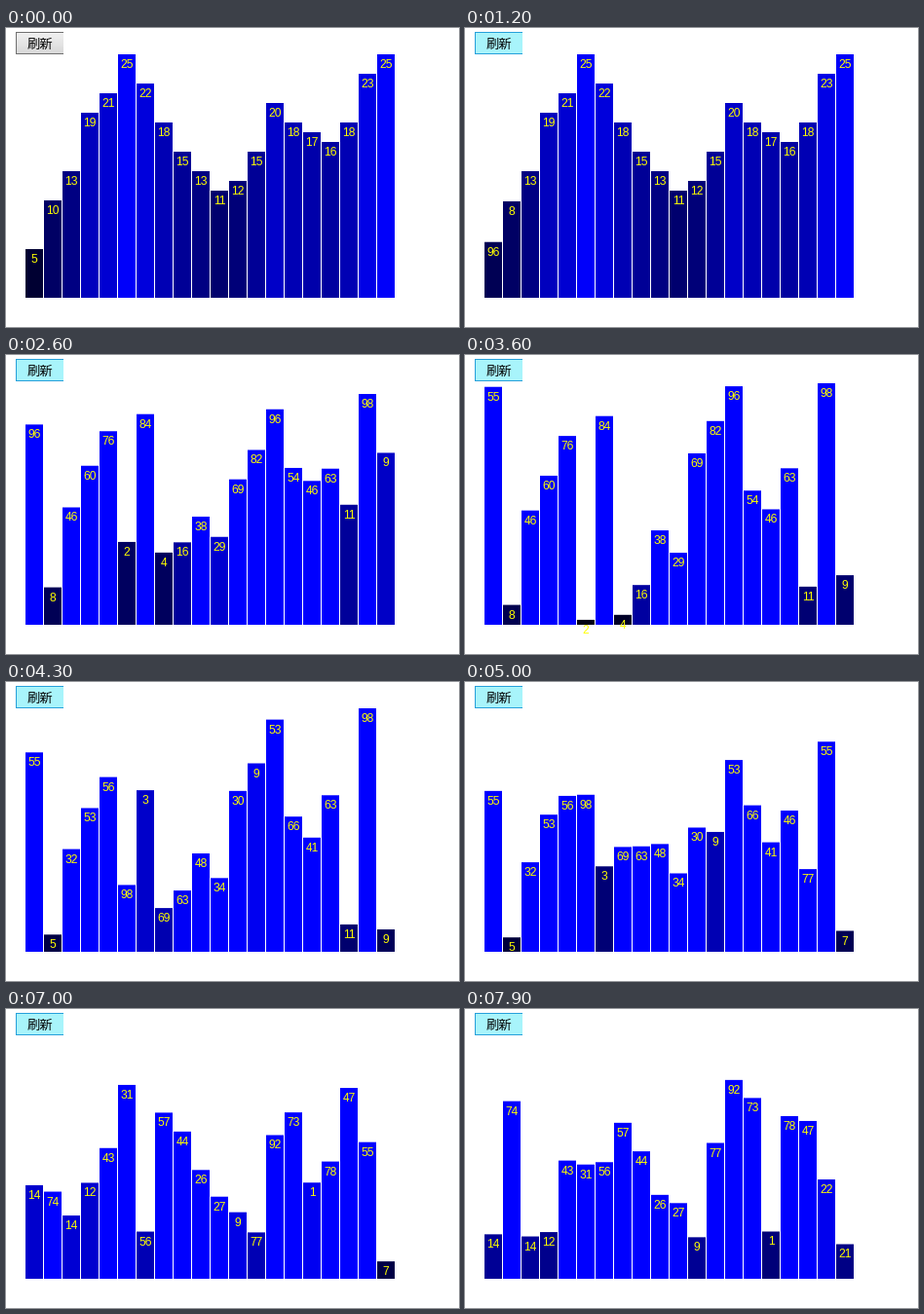
Write a matplotlib script that moves like this. It is 465 px wide and 307 px high and loops after 8000 ms.

```python
import matplotlib.pyplot as plt
import numpy as np
from matplotlib.animation import FuncAnimation
from matplotlib.colors import to_rgb
from matplotlib.patches import Rectangle

W, H, DPI = 465, 307, 100
STEP, FRAMES = 100, 80
LEFT, BASE, BAND, BAR_W, CHART_H = 20, 277, 19, 18, 250
DELAY, DURATION = 50, 2000

FIRST = [5, 10, 13, 19, 21, 25, 22, 18, 15, 13,
         11, 12, 15, 20, 18, 17, 16, 18, 23, 25]
# (clock time of the click, new values)
UPDATES = [
    (0, [96, 8, 46, 60, 76, 2, 84, 4, 16, 38,
         29, 69, 82, 96, 54, 46, 63, 11, 98, 9]),
    (2692, [55, 5, 32, 53, 56, 98, 3, 69, 63, 48,
            34, 30, 9, 53, 66, 41, 46, 77, 55, 7]),
    (5553, [14, 74, 14, 12, 43, 31, 56, 57, 44, 26,
            27, 9, 77, 92, 73, 1, 78, 47, 22, 21]),
]
# The chart's clock runs slightly faster than playback
PLAY_MS = [1132, 1700, 2600, 3600, 5000, 5900, 7900]
CLOCK_MS = [0, 622, 1597, 2704, 4217, 5212, 7404]

HOVER_AT = 600
PRESSES = (1100, 3500, 6100)
# border, top fill, bottom fill
NORMAL = ("#707070", "#f0f0f0", "#d9d9d9")
HOVER = ("#26a0da", "#a8f4fb", "#a8f4fb")
PRESSED = ("#26a0da", "#84e6f8", "#84e6f8")


def px(size):
    return size * 72 / DPI


def gradient(top, bottom, rows=21):
    mix = np.linspace(0, 1, rows)[:, None, None]
    return (1 - mix) * np.array(to_rgb(top)) + mix * np.array(to_rgb(bottom))


fig = plt.figure(figsize=(W / DPI, H / DPI), dpi=DPI, facecolor="white")
ax = fig.add_axes([0, 0, 1, 1])

border = ax.add_patch(Rectangle((10, 4), 49, 23, lw=0, fc=NORMAL[0], zorder=1))
face = ax.imshow(gradient(*NORMAL[1:]), extent=(11, 58, 26, 5),
                 aspect="auto", interpolation="nearest", zorder=2)
ax.text(34.5, 21, "刷新", family="Noto Sans CJK JP", size=px(13.33),
        ha="center", va="baseline", zorder=3)

bars, labels = [], []
for i in range(len(FIRST)):
    x = LEFT + i * BAND
    bars.append(ax.add_patch(
        Rectangle((x, BASE), BAR_W, 0, lw=0, snap=False, zorder=1)))
    labels.append(ax.text(x + BAR_W / 2, BASE, "", color="yellow",
                          family="Liberation Sans", size=px(12),
                          ha="center", va="baseline", zorder=3))

ax.set_xlim(0, W)
ax.set_ylim(H, 0)
ax.axis("off")


def bar_state(i, clock):
    """Value shown, height and blue level of one bar."""
    value = FIRST[i]
    height = value * CHART_H / max(FIRST)
    blue = value * 10
    for start, values in UPDATES:
        elapsed = clock - start - i * DELAY
        if elapsed <= 0:
            break
        p = min(1, elapsed / DURATION)
        value = values[i]
        height += (value * CHART_H / max(values) - height) * p
        blue = min(255, blue + (value * 10 - blue) * p)
    return value, height, blue


def draw_button(t):
    style = PRESSED if t in PRESSES else HOVER if t >= HOVER_AT else NORMAL
    border.set_facecolor(style[0])
    face.set_data(gradient(*style[1:]))


def draw(n):
    t = n * STEP
    draw_button(t)
    clock = np.interp(t, PLAY_MS, CLOCK_MS)
    for i, (bar, label) in enumerate(zip(bars, labels)):
        value, height, blue = bar_state(i, clock)
        top = BASE - height
        bar.set_y(top)
        bar.set_height(height)
        bar.set_facecolor((0, 0, blue / 255))
        label.set_text(str(value))
        label.set_y(top + 14)
    return [border, face, *bars, *labels]


anim = FuncAnimation(fig, draw, frames=FRAMES, interval=STEP,
                     repeat=True, repeat_delay=0, blit=False)
plt.show()
```
